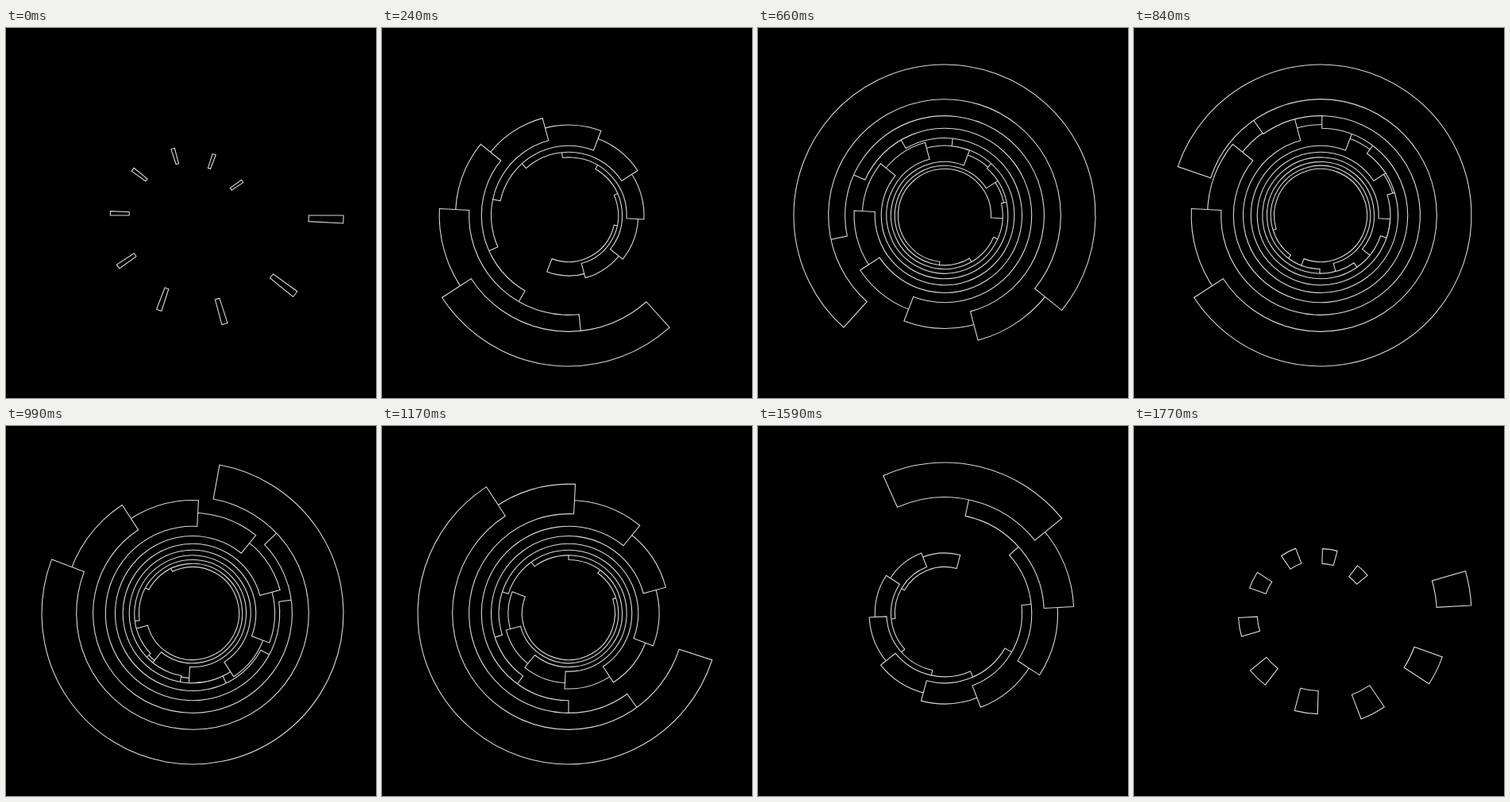
Animation, 466 px wide and 466 px high, one loop 1800 ms. Source, as an HTML page with a canvas:

```html
<!DOCTYPE html>
<html lang="en">
<head>
<meta charset="utf-8">
<title>Spiral of arcs</title>
<style>
  html, body { margin: 0; width: 100%; height: 100%; overflow: hidden; background: #000; }
  canvas { display: block; width: 466px; height: 466px; }
</style>
</head>
<body>
<canvas id="stage" width="466" height="466"></canvas>
<script>
const ctx = document.getElementById('stage').getContext('2d');
const CX = 235, CY = 236;
const RINGS = 10, STEPS = 60, STEP_MS = 30;
const rad = deg => deg * Math.PI / 180;

// Both ends turn at 6° per step; each has one faster stretch that adds a full turn.
const tail = k => 6 * k + 360 * Math.max(0, k - 25) / 35;
const head = k => 3 + 6 * k + 360 * Math.min(1, k / 30);

function drawRing(i, k) {
  const outer = 1140 / (6 + i);
  const inner = outer * 0.77;
  const from = rad(36 * i + tail(k));
  const to = rad(36 * i + head(k));
  ctx.beginPath();
  ctx.arc(CX, CY, outer, from, to);
  ctx.arc(CX, CY, inner, to, from, true);
  ctx.closePath();
  ctx.fill();
  ctx.stroke();
}

function draw(k) {
  ctx.fillStyle = '#000';
  ctx.fillRect(0, 0, 466, 466);
  ctx.strokeStyle = '#d8d8d8';
  ctx.lineWidth = 1.1;
  // Larger rings cover the smaller ones.
  for (let i = RINGS - 1; i >= 0; i--) drawRing(i, k);
}

let start;
function tick(now) {
  start ??= now;
  draw(Math.floor((now - start) / STEP_MS) % STEPS);
  requestAnimationFrame(tick);
}
draw(0);
requestAnimationFrame(tick);
</script>
</body>
</html>
```
